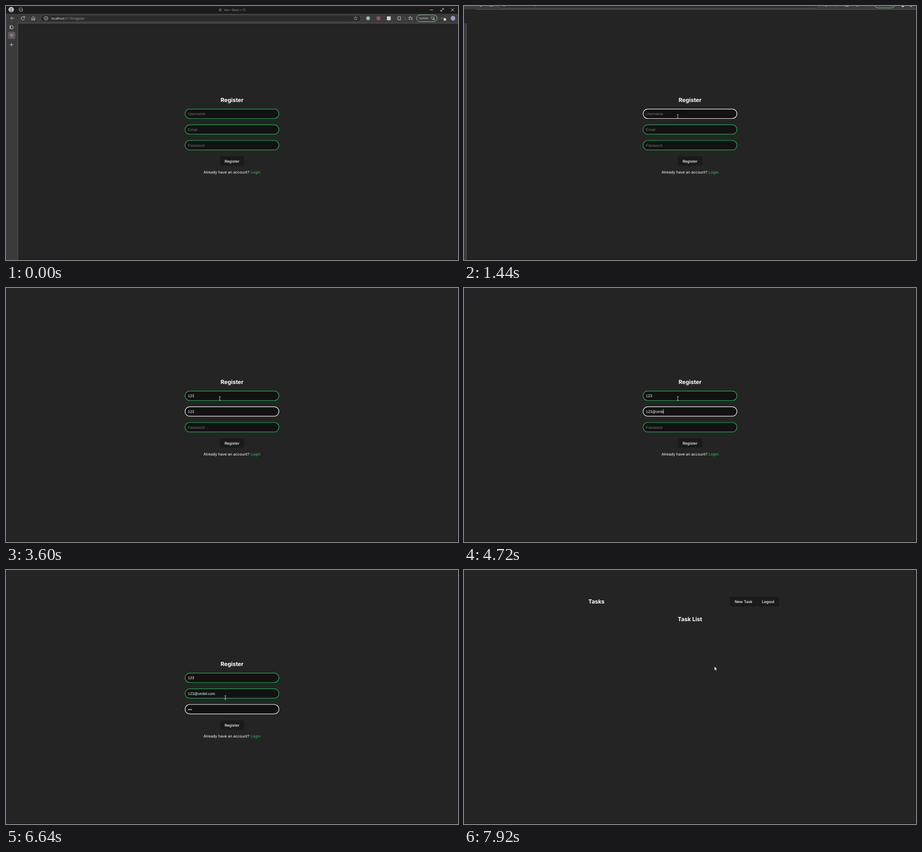
Animation, 998 px wide and 561 px high, one loop 8 s. Source, as an HTML page:

```html
<!DOCTYPE html>
<html lang="en">
<head>
<meta charset="utf-8">
<title>Register</title>
<style>
  html, body { margin: 0; height: 100%; overflow: hidden; background: #242424; }
  svg { display: block; width: 998px; height: 561px; text-rendering: geometricPrecision; }
  text { fill: #fff; }
  .page text { font: 400 8.32px Inter, sans-serif; }
  .page .heading { font-weight: 700; font-size: 12.48px; }
  .page .label { font-weight: 500; }
  .page .value { font-family: "Liberation Sans", Arial, sans-serif; }
  .mid { text-anchor: middle; }
  .link { fill: #1db954; font-weight: 500; }
  .field { fill: #121212; stroke-width: 1.2; }
  .button { fill: #1a1a1a; }
  .chrome text { font: 6.93px "Open Sans", sans-serif; }
  .icon { fill: none; stroke: #e2e2e2; stroke-width: .9; stroke-linecap: round; stroke-linejoin: round; }
  .cursor path { fill: #fff; stroke: #111; stroke-width: .5; }
</style>
</head>
<body>
<svg viewBox="0 0 998 561">
  <rect width="998" height="561" fill="#242424"/>

  <g class="page" id="registerPage">
    <text class="heading mid" x="499" y="212">Register</text>
    <g id="fields"></g>
    <rect id="caret" width=".8" height="10" fill="#fff"/>
    <rect class="button" id="submit" x="472.3" y="331.9" width="53.4" height="20.8" rx="4.2" stroke="#fff" stroke-width="1.2"/>
    <text class="label mid" x="499" y="345.5">Register</text>
    <text class="mid" x="499" y="370.3">Already have an account? <tspan class="link">Login</tspan></text>
  </g>

  <g class="page" id="tasksPage">
    <text class="heading" x="274.5" y="74">Tasks</text>
    <rect class="button" x="587" y="59" width="60" height="21.5" rx="4.2"/>
    <rect class="button" x="647" y="59" width="49" height="21.5" rx="4.2"/>
    <text class="label mid" x="617.2" y="73">New Task</text>
    <text class="label mid" x="671.5" y="73">Logout</text>
    <text class="heading mid" x="499" y="113.3">Task List</text>
  </g>

  <path d="M0 560.5H998M997.6 0V561" stroke="#151515"/>

  <g class="chrome" id="sidebar">
    <rect y="38" width="26" height="523" fill="#3b3b3b"/>
    <path d="M26 38V561" stroke="#666" stroke-width=".9"/>
    <rect x="4.5" y="56.5" width="16" height="16.5" rx="3" fill="#5a5a5a"/>
    <circle cx="12.5" cy="64.5" r="3.8" fill="#96708f"/>
    <g class="icon">
      <rect x="8.5" y="43.7" width="7" height="6.6" rx="1.2"/>
      <path d="M10 44V50M8.5 85.5H15.5M12 82V89"/>
    </g>
  </g>

  <g class="chrome" id="topbar">
    <rect width="998" height="38" fill="#3b3b3b"/>
    <rect width="998" height="17" fill="#1b1b1b"/>
    <path d="M26 38H998" stroke="#666" stroke-width=".9"/>
    <circle cx="11.5" cy="8" r="6" fill="#c9c9c9"/>
    <circle cx="11.5" cy="6.3" r="2" fill="#777"/>
    <path d="M7.8 11.6Q11.5 7 15.2 11.6Q11.5 14.8 7.8 11.6Z" fill="#777"/>
    <g id="tabTitle">
      <path class="icon" d="M29 5L32.5 3.8L36 5V10L32.5 12.3L29 10ZM31 7.5H36.5V11.5H31Z"/>
      <circle cx="473" cy="8.5" r="3.2" fill="#a0607c"/>
      <text x="481" y="10.8" style="font-size:6.3px">Vite + React + TS</text>
    </g>
    <rect x="76" y="19.6" width="708" height="15.4" rx="7.7" fill="#2b2b2b" stroke="#5c5c5c" stroke-width=".8"/>
    <text x="100" y="29.6">localhost<tspan fill="#a8a8a8">:5173/register</tspan></text>
    <g class="icon">
      <path d="M936 8.5H942.5M959 12.5L962 9.5M962 12.2V9.5H959.3M967 4.5L964 7.5M964 4.8V7.5H966.7M983 5.5L989 11.5M989 5.5L983 11.5"/>
      <path d="M10.5 27H18M13.7 23.7L10.5 27L13.7 30.3"/>
      <path d="M40.6 25A3.8 3.8 0 1 0 41.2 28M41 22.8V25.4H38.4"/>
      <path d="M57 26.5L60.3 23.3L63.6 26.5V30.8H61.5V28H59.1V30.8H57Z"/>
      <circle cx="88.3" cy="27" r="3.9"/>
      <path d="M88.3 26.7V29M88.3 25V25.1"/>
      <path id="star" stroke="#999" d="M772 22.8L773.2 25.5L776.1 25.8L773.9 27.8L774.6 30.7L772 29.2L769.4 30.7L770.1 27.8L767.9 25.8L770.8 25.5Z"/>
      <path d="M865.5 24H867.2A1.2 1.2 0 0 1 869.5 24H871.3V26A1.2 1.2 0 0 0 871.3 28.4V30.5H865.5Z"/>
      <path d="M881 23V31" stroke="#666"/>
      <path d="M892.5 22.9L893.6 25.3L896.3 25.6M892.5 22.9L891.4 25.3L888.8 25.7L890.7 27.6L890.2 30.4L892.5 29.2M894.5 27.5H897.5M894.5 30H897.5"/>
      <rect x="906.4" y="19.6" width="45.4" height="15" rx="7.5" stroke="#a3d9a5"/>
      <path d="M942.3 30.3L938.7 26.8Q938 23.6 940.4 23.5L942.3 24.8Q944.5 22.6 946 25.2Q946.5 27 942.3 30.3Z" stroke="#a3d9a5"/>
    </g>
    <circle cx="944.5" cy="29" r="2.4" fill="#58a868"/>
    <text x="911.7" y="29.4" style="font-size:6.15px;fill:#c4e8c5">Update</text>
    <circle cx="799.5" cy="27" r="4.3" fill="#8fc3ac"/>
    <circle cx="822.5" cy="27" r="4.6" fill="#96505a"/>
    <rect x="841" y="23" width="8.4" height="8.4" fill="#d5d5d5"/>
    <path d="M962 27H962.1M965 27H965.1M968 27H968.1" stroke="#ddd" stroke-width="1.3" stroke-linecap="round"/>
    <circle cx="969" cy="29.8" r="2.8" fill="#e3dfd0"/>
    <circle cx="987" cy="27" r="5.2" fill="#8f9fc4"/>
  </g>

  <g class="cursor" id="cursor">
    <path id="arrow" d="M0 0V8.6L2 6.9L3.4 9.8L4.8 9.2L3.4 6.3H6Z"/>
    <path id="hand" d="M-1 1A1 1 0 0 1 1 1V4L4.2 4.8Q5.6 5.2 5.3 6.8L4.6 10.8H-.4L-3.2 7Q-3.6 5.6-2.2 5.8L-1 6.8Z"/>
    <path id="beam" d="M-1.8-4H1.8M0-4V4M-1.8 4H1.8" style="stroke:#ddd;stroke-width:.9"/>
  </g>
</svg>
<script>
const LOOP = 8000, STEP = 80, BLINK = 520;
const $ = id => document.getElementById(id);
const show = (el, on) => el.setAttribute('visibility', on ? 'visible' : 'hidden');
const clamp = v => Math.max(0, Math.min(1, v));
const ease = v => { v = clamp(v); return v * v * (3 - 2 * v); };

// [time, focused field, text typed at that moment]
const events = [
  [640, 0, ''], [720, 0, ''], [2160, 0, '1'], [2240, 0, '2'], [2320, 0, '3'],
  [2640, 1, ''], [2880, 1, '1'], [2960, 1, '2'], [3040, 1, '3'],
  [4240, 1, '@'], [4480, 1, 'o'], [4640, 1, 'm'], [4720, 1, 'b'], [4880, 1, 'i'],
  [4960, 1, 'l'], [5120, 1, '.'], [5200, 1, 'c'], [5360, 1, 'om'],
  [5520, 2, ''], [5840, 2, '•'], [5920, 2, '•'], [6080, 2, '•'], [7040, -1, '']
];
// [start, duration, x, y]
const moves = [[0, 400, 472, 244], [6480, 400, 507, 351], [7680, 240, 553, 213]];

const fields = ['Username', 'Email', 'Password'].map((placeholder, i) => {
  const y = 227.6 + i * 34.7;
  $('fields').insertAdjacentHTML('beforeend',
    `<rect class="field" x="395.4" y="${y}" width="207.2" height="20.9" rx="10.4"/>
     <text class="value" x="401.6" y="${y + 13.5}"></text>`);
  const [box, text] = [...$('fields').children].slice(-2);
  return { placeholder, y, box, text };
});

function drawForm(t) {
  const values = ['', '', ''];
  let focus = -1, since = 0;
  for (const [time, field, typed] of events) {
    if (time > t) break;
    focus = field;
    since = time;
    if (field >= 0) values[field] += typed;
  }
  fields.forEach(({ placeholder, box, text }, i) => {
    box.style.stroke = i === focus ? '#fff' : '#1db954';
    text.textContent = values[i] || placeholder;
    text.style.fill = values[i] ? '#fff' : '#757575';
  });
  const active = fields[focus];
  show($('caret'), active && t < 7440 && Math.floor((t - since) / BLINK) % 2 === 0);
  if (active) {
    const width = values[focus] ? active.text.getComputedTextLength() : 0;
    $('caret').setAttribute('x', 401.4 + width);
    $('caret').setAttribute('y', active.y + 5.4);
  }
  $('submit').style.strokeOpacity = clamp((t - 6800) / 240);
}

function drawCursor(t) {
  let x = 955, y = 12;
  for (const [start, duration, toX, toY] of moves) {
    const p = ease((t - start) / duration);
    x += (toX - x) * p;
    y += (toY - y) * p;
  }
  const onForm = t < 7440;
  const overButton = onForm && y > 332 && y < 353 && x > 472 && x < 526;
  const overField = onForm && x > 395 && x < 603 && fields.some(f => y > f.y && y < f.y + 21);
  $('cursor').setAttribute('transform', `translate(${x} ${y})`);
  show($('arrow'), t > 0 && !overButton && !overField);
  show($('hand'), overButton);
  show($('beam'), overField);
}

function drawChrome(t) {
  const hidden = t < 1440 ? 0 : t < 1600 ? 1 - .2 ** ((t - 1360) / 80) : 1.1;
  $('topbar').setAttribute('transform', `translate(0 ${-38 * hidden})`);
  $('sidebar').setAttribute('transform', `translate(${-26 * hidden} 0)`);
  $('tabTitle').setAttribute('opacity', t < 640 ? .6 : .9);
}

function frame(now) {
  const t = Math.floor(now % LOOP / STEP) * STEP;
  show($('registerPage'), t < 7440);
  show($('tasksPage'), t >= 7440);
  drawForm(t);
  drawCursor(t);
  drawChrome(t);
  requestAnimationFrame(frame);
}
frame(0);
</script>
</body>
</html>
```
